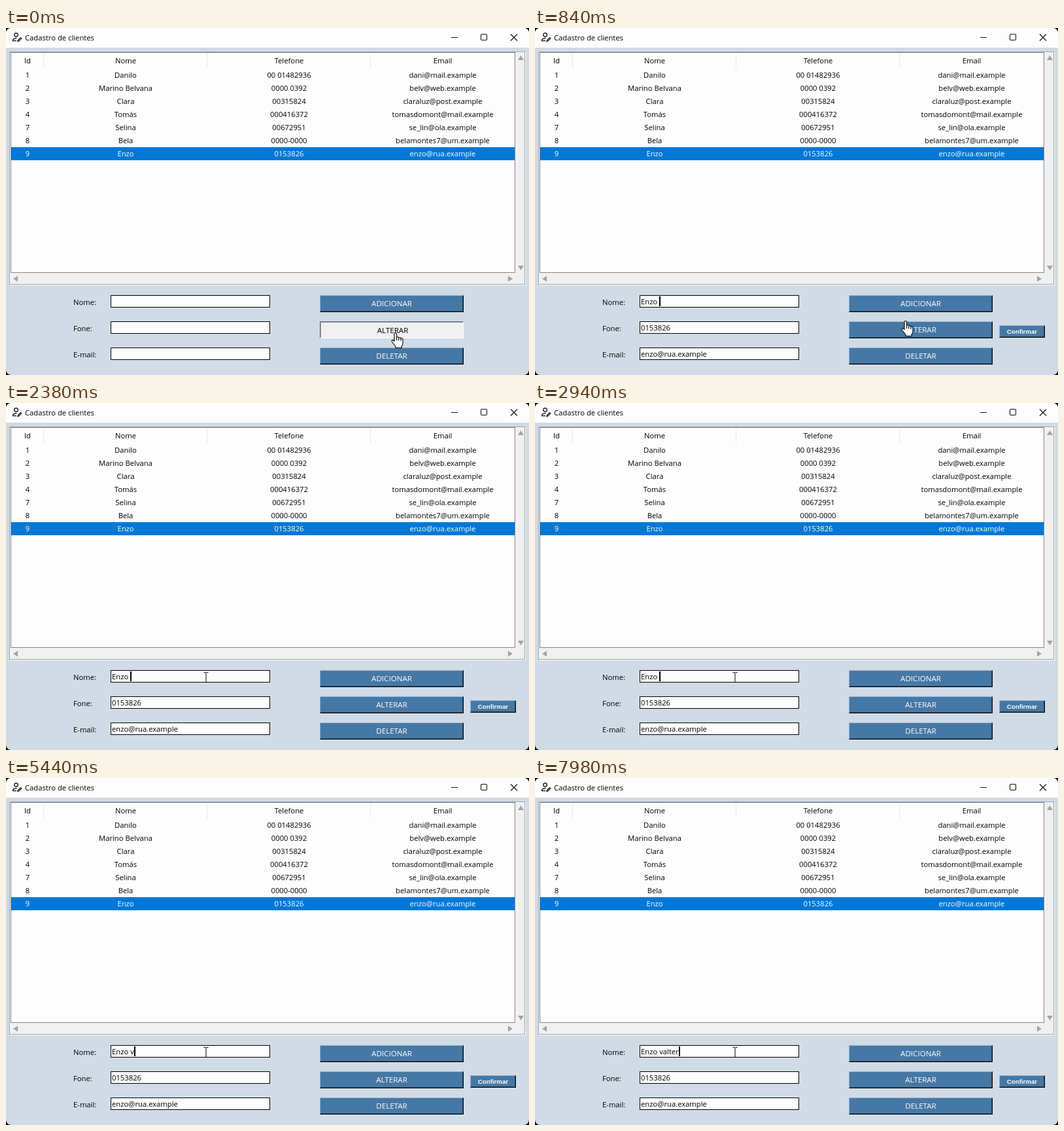
Animation of 800 by 530 pixels, one loop 8000 ms. Source, as an HTML page:

```html
<!DOCTYPE html>
<html lang="pt">
<head>
<meta charset="utf-8">
<title>Cadastro de clientes</title>
<style>
  html, body { margin: 0; width: 100%; height: 100%; overflow: hidden; background: #000; }
  * { box-sizing: border-box; }
  #win {
    position: relative; width: 800px; height: 530px; overflow: hidden;
    border-radius: 8px; background: #d0dbe6; color: #000;
    font: 11.25px/20px "Open Sans", "Noto Sans", sans-serif; white-space: pre;
  }
  #win > *, #table > * { position: absolute; }
  #bar { left: 0; top: 0; width: 800px; height: 30px; background: #fdfdfd; }
  #title { left: 29px; top: 5px; }
  #frame {
    left: 5px; top: 36px; width: 790px; height: 357px; background: #f0f0f0;
    border: 1px solid #a0a0a0; border-right-color: #fff; border-bottom-color: #fff;
    box-shadow: inset -1px -1px #a0a0a0, inset 1px 1px #fff;
  }
  #table {
    left: 7px; top: 37px; width: 772px; height: 337px; background: #fdfdfd;
    border: 1px solid #828790; overflow: hidden;
  }
  .row { left: 0; width: 770px; height: 20px; }
  .row span { position: absolute; top: 0; text-align: center; }
  .row span:nth-child(1) { left: 0; width: 50px; }
  .row span:nth-child(2) { left: 50px; width: 250px; }
  .row span:nth-child(3) { left: 300px; width: 250px; }
  .row span:nth-child(4) { left: 550px; width: 220px; }
  .sel { background: #0078d7; color: #fff; }
  .sep { top: 0; width: 1px; height: 24px; background: #e8e8e8; }
  .label { left: 103px; }
  .field {
    left: 160px; width: 244px; height: 19px; padding-left: 1px;
    background: #fdfdfd; border: 1px solid #000; line-height: 18px;
  }
  #caret {
    display: inline-block; width: 2px; height: 15px; margin-right: -2px;
    background: #000; vertical-align: middle; position: relative; top: -1px;
  }
  .btn {
    left: 480px; width: 220px; height: 26px; text-align: center;
    font-size: 11.6px; line-height: 22px; color: #fff; background: #4678a5;
    border: 1px solid; border-color: #98b6d0 #000 #000 #98b6d0;
    box-shadow: inset -1px -1px #2d4f6e; padding-top: 1px;
  }
  .hover { color: #000; background: #f0f0f0; box-shadow: inset -1px -1px #a0a0a0;
    border-color: #fff #696969 #696969 #fff; }
  .pressed { border-color: #696969 #fff #fff #696969; box-shadow: inset 1px 1px #a0a0a0;
    padding: 2px 0 0 3px; }
  #ok {
    left: 710px; top: 454px; width: 70px; height: 19px; padding: 0;
    font: bold 9.7px/17px "Liberation Sans", Arial, sans-serif;
  }
  svg { left: 0; top: 0; overflow: visible; }
</style>
</head>
<body>
<div id="win">
  <div id="bar"></div>
  <div id="title">Cadastro de clientes</div>
  <div id="frame"></div>
  <div id="table"></div>
  <div class="label" style="top:409px">Nome:</div>
  <div class="label" style="top:449px">Fone:</div>
  <div class="label" style="top:489px">E-mail:</div>
  <div class="field" style="top:408px"><span id="name"></span><i id="caret"></i></div>
  <div class="field" style="top:448px" id="phone"></div>
  <div class="field" style="top:488px" id="mail"></div>
  <div class="btn" style="top:408px">ADICIONAR</div>
  <div class="btn" style="top:448px" id="edit">ALTERAR</div>
  <div class="btn" style="top:488px">DELETAR</div>
  <div class="btn" id="ok">Confirmar</div>
  <svg width="800" height="530" fill="none">
    <g stroke="#111" stroke-width="1.1">
      <path d="M681 14.5h10M772 9.5l10 10M782 9.5l-10 10"/>
      <rect x="726.5" y="9.5" width="9" height="9" rx="1.5"/>
    </g>
    <g stroke="#222" stroke-width="1.4">
      <circle cx="15.5" cy="10.5" r="2.8"/>
      <path d="M16 19.5h-5.5v-1.5q1.5-2.5 6-2.3M18 20.5l.4-1.8 4-4 1.3 1.3-4 4z"/>
    </g>
    <path fill="#a3a3a3" d="M783 49l4.5-7 4.5 7zM783 363l4.5 7 4.5-7zM18 378.5l-7 4.5 7 4.5zM768 378.5l7 4.5-7 4.5z"/>
    <g id="hand" stroke="#000" stroke-width="1.1" stroke-linejoin="round">
      <path fill="#fff" d="M-2 13.5V2Q-2 .5-.2 .5T1.6 2V8Q1.6 6.8 3.2 6.8T4.8 8.3V9Q5 7.7 6.5 7.7T8 9.2V10Q8.2 8.8 9.5 8.9T11 10.5V16Q11 19 9 21V23.5H0V21.5L-5.5 14.5Q-6.5 12.8-5.3 12T-3 12.5Z"/>
      <path d="M1.6 8v4M4.8 9v3.5M8 10v3"/>
    </g>
    <path id="arrow" fill="#fff" stroke="#000" d="M.5 .5v16l3.7-3.6 2.5 5.7 2.4-1-2.4-5.6h5.2z"/>
    <path id="beam" stroke="#000" d="M-3.5-7.5h3M.5-7.5h3M-3.5 7.5h3M.5 7.5h3M0-7V7"/>
  </svg>
</div>
<script>
const LOOP = 8000;
const $ = id => document.getElementById(id);
const rows = [
  ["Id", "Nome", "Telefone", "Email"],
  ["1", "Danilo", "00 01482936", "dani@mail.example"],
  ["2", "Marino Belvana", "0000 0392", "belv@web.example"],
  ["3", "Clara", "00315824", "claraluz@post.example"],
  ["4", "Tomás", "000416372", "tomasdomont@mail.example"],
  ["7", "Selina", "00672951", "se_lin@ola.example"],
  ["8", "Bela", "0000-0000", "belamontes7@um.example"],
  ["9", "Enzo", "0153826", "enzo@rua.example"]
];
const client = rows[7];

function add(cls, style, parent) {
  const el = document.createElement("div");
  el.className = cls;
  el.style.cssText = style;
  parent.append(el);
  return el;
}
rows.forEach((cells, i) => {
  const top = i ? 4 + 20 * i : 2;
  const row = add(i === 7 ? "row sel" : "row", `top:${top}px`, $("table"));
  for (const text of cells) {
    const span = document.createElement("span");
    span.textContent = text;
    row.append(span);
  }
});
for (const x of [49, 299, 549]) add("sep", `left:${x}px`, $("table"));

// pointer steps: time, kind, x, y
const moves = [
  [0, "hand", 596, 465], [540, "hand", 584, 457], [840, "hand", 567, 447],
  [1140, "arrow", 470, 449], [1420, "beam", 404, 458], [1800, "beam", 372, 452],
  [2100, "beam", 330, 424], [2380, "beam", 306, 419]
];
const keys = [4360, 5640, 6040, 6320, 6560, 6720];
const caretOff = [[0, 280], [1140, 1420], [1800, 2100], [2640, 2940],
  [3480, 3900], [5040, 5440], [7260, 7680]];

function draw(t) {
  const filled = t >= 280;
  const typed = keys.filter(k => t >= k).length;
  $("name").textContent = filled ? client[1] + " " + "valter".slice(0, typed) : "";
  $("phone").textContent = filled ? client[2] : "";
  $("mail").textContent = filled ? client[3] : "";
  $("ok").style.display = filled ? "" : "none";
  $("edit").className = "btn" + (t < 840 ? " hover" : "") + (filled ? "" : " pressed");
  const off = caretOff.some(([a, b]) => t >= a && t < b);
  $("caret").style.visibility = off ? "hidden" : "visible";
  const [, kind, x, y] = moves.filter(m => t >= m[0]).pop();
  for (const id of ["hand", "arrow", "beam"]) {
    $(id).style.display = id === kind ? "" : "none";
    $(id).setAttribute("transform", `translate(${x} ${y})`);
  }
}
const start = performance.now();
function tick() {
  draw((performance.now() - start) % LOOP);
  requestAnimationFrame(tick);
}
tick();
</script>
</body>
</html>
```
